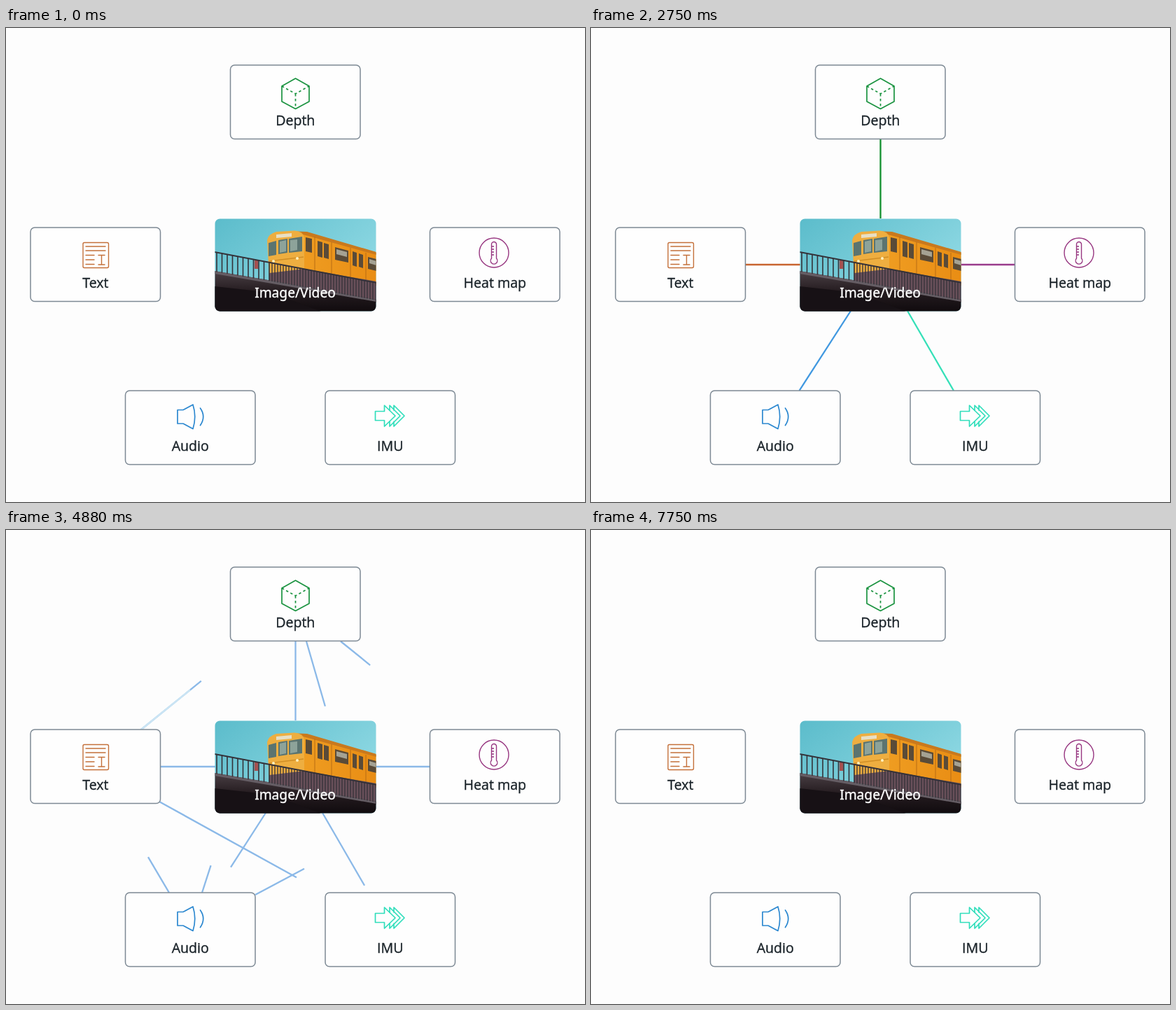
Animation of 827x677 px, one loop 7880 ms. Source, as an HTML page:

```html
<!DOCTYPE html>
<html lang="en">
<head>
<meta charset="utf-8">
<title>Linked modalities</title>
<style>
  html, body { margin: 0; width: 100%; height: 100%; overflow: hidden; background: #fdfdfd; }
  svg { display: block; width: 100%; height: 100%; }
  text { font: 19.6px "Open Sans", "Noto Sans", sans-serif; fill: #1a2329; stroke: #1a2329; stroke-width: 0.35; text-anchor: middle; }
  .photo-label { font: 19.2px "Noto Sans", sans-serif; fill: #fff; stroke: #fff; }
  .icon { fill: none; stroke-width: 1.7; stroke-linejoin: round; stroke-linecap: round; }
  .thin { stroke-width: 1.4; }
  .card { fill: #fefefe; stroke: #7d8994; stroke-width: 1.5; }
</style>
</head>
<body>
<svg id="stage" viewBox="0 0 827 677">
  <defs>
    <clipPath id="frame"><rect x="298.5" y="272.5" width="230" height="132" rx="7"/></clipPath>
    <linearGradient id="sky" x1="0" y1="0" x2="0.8" y2="0.6">
      <stop offset="0" stop-color="#5bbccb"/><stop offset="1" stop-color="#8ad6e1"/>
    </linearGradient>
    <linearGradient id="side" x1="0" y1="0" x2="1" y2="0">
      <stop offset="0" stop-color="#f0a024"/><stop offset="1" stop-color="#e98d14"/>
    </linearGradient>
    <linearGradient id="under" x1="0" y1="0" x2="0" y2="1">
      <stop offset="0" stop-color="#4a4045"/><stop offset="0.5" stop-color="#251c20"/>
      <stop offset="1" stop-color="#100b0e"/>
    </linearGradient>
  </defs>

  <g id="links"></g>
  <g id="cards"></g>

  <g class="icon" stroke="#1b9340">
    <path d="M413.5 72L433 83V105L413.5 115.5L394 105V83Z"/>
    <path d="M394 83L413.5 94L433 83M413.5 94V115" stroke-dasharray="3.5 3.5" stroke-linecap="butt"/>
  </g>
  <g class="icon thin" stroke="#c4703a">
    <rect x="110" y="306.5" width="36.5" height="36" rx="2"/>
    <path d="M114 312H142M114 318H142M114 324.5H126M114 331H126M114 337.5H126M132 324.5H141M136.5 324.5V338M132 338H141"/>
  </g>
  <g class="icon" stroke="#2c88d0">
    <path d="M245 545.5H253L267 538Q272.5 555 267 572.5L253 565H245Z"/>
    <path d="M277.5 543Q286 555 277.5 567.5"/>
  </g>
  <g class="icon" stroke="#30debb">
    <path d="M527.5 547.5H540.5V539L556 554L540.5 569V560.5H527.5Z"/>
    <path d="M548 546V539L563 554L548 569V562M554 546V539L569 554L554 569V562"/>
  </g>
  <g class="icon thin" stroke="#973680">
    <circle cx="697" cy="321" r="21"/>
    <path d="M693.5 329V309A3.5 3.5 0 0 1 700.5 309V329A4.8 4.8 0 1 1 693.5 329Z"/>
    <path stroke-linecap="butt" d="M694 312H697M694 316H697M694 320H697M694 324H697"/>
  </g>

  <g clip-path="url(#frame)">
    <rect x="298" y="272" width="231" height="133" fill="url(#sky)"/>
    <path d="M404 290L430 292L529 321V368L426 352L400 340Z" fill="url(#side)"/>
    <path d="M404 290L430 291L529 320V324L428 296Z" fill="#c9791d"/>
    <path d="M373 303Q375 294 386 291L412 289.5Q424 290 426 299V354L400 362L376 358Z" fill="#eeae40"/>
    <path d="M386 295L408 293V298L386 300Z" fill="#e8dfc4"/>
    <path d="M375 307L386 304V324L375 326ZM389 303L402 301V321L389 323ZM404 301L423 298V319L404 321Z" fill="#5b7470"/>
    <path d="M391 305L400 303V319L391 321ZM406 303L416 302V317L406 319Z" fill="#8da39a"/>
    <path d="M428 299L437 301V321L428 319ZM445 304L452 306V328L445 326ZM454 307L461 309V330L454 328ZM470 313L489 318V335L470 331ZM495 319L501 321V341L495 339ZM504 322L510 324V343L504 341ZM517 327L529 330V347L517 344Z" fill="#5a4b38"/>
    <path d="M472 316L487 320V327L472 323ZM519 330L529 333V339L519 336Z" fill="#a5a293"/>
    <path d="M441 298V352M465 306V354M492 314V358M514 321V362" stroke="#b86d14"/>
    <path d="M376 333L425 327" stroke="#d08e25" stroke-width="1.5"/>
    <circle cx="382" cy="333" r="2" fill="#fff1bd"/><circle cx="416" cy="329" r="2" fill="#fff1bd"/>
    <path d="M376 350L426 344L529 362V392L376 363Z" fill="#69505a"/>
    <path d="M298 347L380 361L529 388V405H298Z" fill="url(#under)"/>
    <path d="M298 347L380 361L529 388V391L380 365L298 351Z" fill="#655d64"/>
    <path d="M298 369L380 378L450 405H298Z" fill="#171115"/>
    <rect x="355" y="332" width="5" height="12" fill="#a65050"/>
    <g id="rail" stroke="#343138"></g>
    <path id="shine" d="M345 272H455L395 405H285Z" fill="#fff" opacity="0.14"/>
  </g>
  <text class="photo-label" x="413" y="385">Image/Video</text>
</svg>
<script>
const LOOP = 7880, STEP = 125;
const NS = "http://www.w3.org/2000/svg";
const $ = id => document.getElementById(id);
const clamp = v => Math.max(0, Math.min(1, v));
const ramp = (t, start, span) => clamp((t - start) / span);

function add(parent, tag, attrs, text) {
  const el = document.createElementNS(NS, tag);
  for (const key in attrs) el.setAttribute(key, attrs[key]);
  if (text) el.textContent = text;
  parent.append(el);
  return el;
}

const cards = [
  ["Depth", 320.5, 53], ["Text", 35, 285], ["Heat map", 605.5, 285],
  ["Audio", 170.5, 518], ["IMU", 456, 518]
];
for (const [name, x, y] of cards) {
  add($("cards"), "rect", { class: "card", x, y, width: 185.5, height: 105.5, rx: 6 });
  add($("cards"), "text", { x: x + 92.8, y: y + 86 }, name);
}

// Bridge railing: wide posts on the left, dense ones beside the train
const railTop = x => 320 + (x - 298) * 0.19;
const deck = x => x < 380 ? 347 + (x - 298) * 0.17 : 361 + (x - 380) * 0.18;
const post = (x, width) =>
  add($("rail"), "line", { x1: x, y1: railTop(x), x2: x, y2: deck(x) + 1, "stroke-width": width });
for (let x = 301; x < 380; x += 7.5) post(x, 1.6);
for (let x = 380; x < 529; x += 4) post(x, 1.3);
add($("rail"), "line", { x1: 298, y1: railTop(298), x2: 529, y2: railTop(529), "stroke-width": 2 });

// Spokes: end points, colour, first start, second start
const spokes = [
  [[413.5, 272, 413.5, 159], "#12902f", 365, 3900],
  [[299, 338, 221, 338], "#c8642f", 310, 4000],
  [[528, 338, 606, 338], "#993b8b", 100, 4200],
  [[452, 404, 518, 518], "#35e0b8", 170, 4420],
  [[371, 404, 297.5, 518], "#4098e0", 240, 4535]
];
// Links between cards: end points, start
const outer = [
  [[219, 388, 458, 520], 4383],
  [[193, 285, 349, 159], 4545],
  [[233, 518, 158, 391], 4635],
  [[356, 521, 606, 388], 4707],
  [[478, 159, 634, 285], 4713],
  [[429, 159, 533, 518], 4720],
  [[280, 518, 396, 159], 4810],
  [[663, 391, 583, 518], 4880]
];
const BLUE = "#8bb9e8", GLOW = "#cce6f4";
const FADE_1 = 2750, FADE_2 = 7050;
const segments = [];

function segment(ends, color, start, span, fade, tail) {
  const el = add($("links"), "line", { stroke: color, "stroke-width": 2.3 });
  segments.push({ el, ends, start, span, fade, tail });
}
for (const [ends, color, first, second] of spokes) {
  segment(ends, color, first, 500, FADE_1);
  segment(ends, BLUE, second, 500, FADE_2);
}
for (const [ends, start] of outer) segment(ends, BLUE, start, 600, FADE_2);
segment(outer[1][0], GLOW, 4650, 500, FADE_2, 0.5);
segment(spokes[0][0], GLOW, 6635, 500, FADE_2, 0.5);

function drawSegment({ el, ends, start, span, fade, tail }, t) {
  const [x1, y1, x2, y2] = ends;
  const raw = (t - start) / span;
  const head = clamp(raw), foot = tail ? clamp(raw - tail) : 0;
  const alpha = 1 - ramp(t, fade, 600);
  el.setAttribute("x1", x1 + (x2 - x1) * foot);
  el.setAttribute("y1", y1 + (y2 - y1) * foot);
  el.setAttribute("x2", x1 + (x2 - x1) * head);
  el.setAttribute("y2", y1 + (y2 - y1) * head);
  el.setAttribute("opacity", head > foot ? alpha : 0);
}

function draw(time) {
  const t = Math.floor((time % LOOP) / STEP) * STEP;
  for (const s of segments) drawSegment(s, t);
  $("shine").setAttribute("transform", `translate(${(t - 750) * 0.5} 0)`);
}

const begin = performance.now();
function tick() {
  draw(performance.now() - begin);
  requestAnimationFrame(tick);
}
tick();
</script>
</body>
</html>
```
